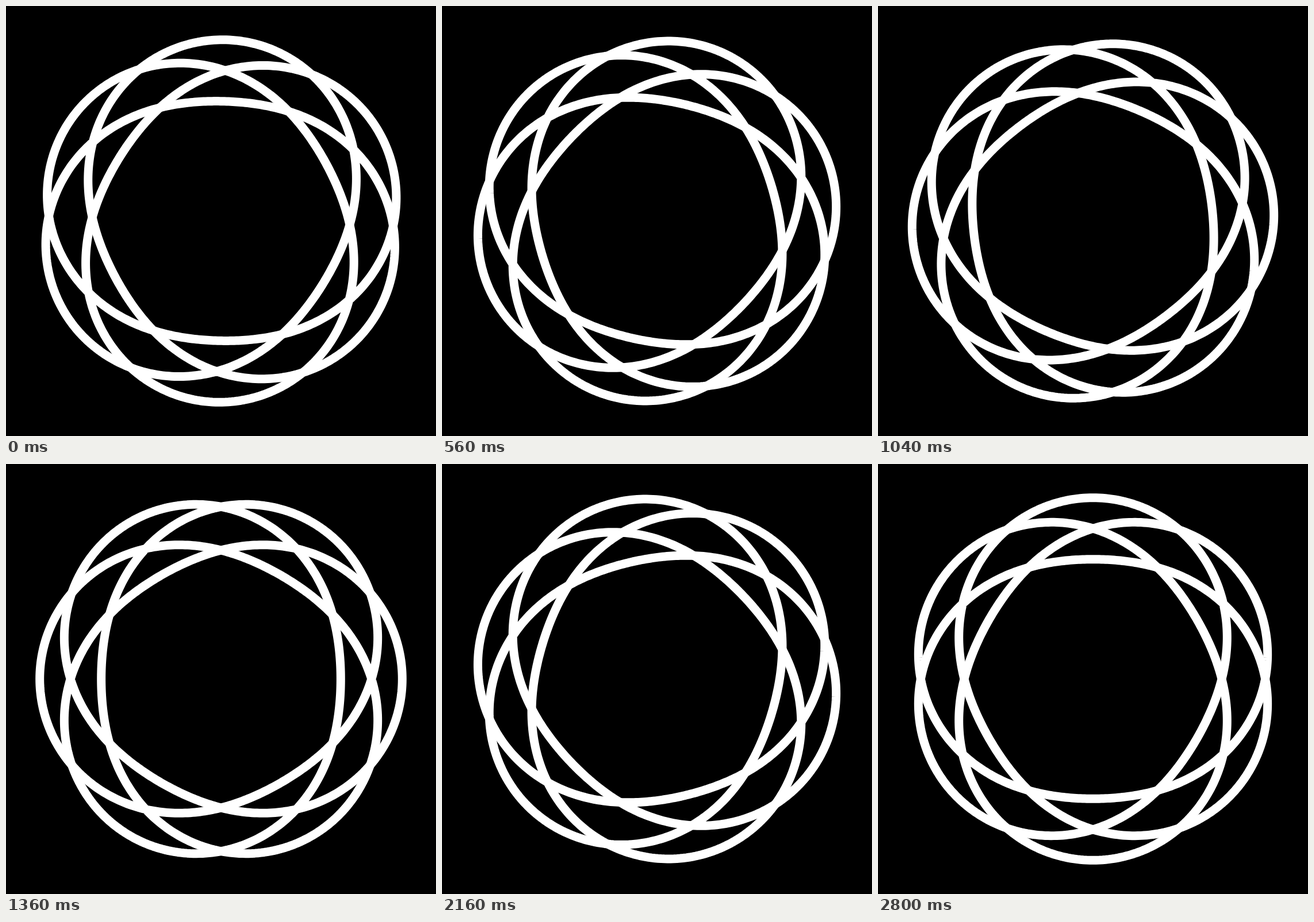
Write an HTML page with a canvas that moves like this. It is 748 px wide and 748 px high and loops after 2.88 s.

```html
<!DOCTYPE html>
<html lang="en">
<head>
<meta charset="utf-8">
<title>Turning rosette</title>
<style>
  html, body { margin: 0; width: 100%; height: 100%; overflow: hidden; background: #000; }
  canvas { display: block; }
</style>
</head>
<body>
<canvas id="stage" width="748" height="748"></canvas>
<script>
const ctx = document.getElementById('stage').getContext('2d');
const SIZE = 748, LOOP = 2880, STEP = 80;
const RADIUS = 261.8, WAVE = 53.5, LINE = 15;
const TURN = Math.PI / 3; // one loop turns the six-fold figure onto itself

// Radius swings 1.5 times per revolution, so each strand closes after two.
function addStrand(phase) {
  const segments = 720;
  for (let i = 0; i < segments; i++) {
    const angle = i / segments * 4 * Math.PI;
    const r = RADIUS + WAVE * Math.cos(1.5 * angle + phase);
    ctx.lineTo(r * Math.sin(angle), -r * Math.cos(angle));
  }
  ctx.closePath();
}

function draw(time) {
  const step = Math.floor(time % LOOP / STEP) + 1;
  ctx.setTransform(1, 0, 0, 1, 0, 0);
  ctx.fillStyle = '#000';
  ctx.fillRect(0, 0, SIZE, SIZE);
  ctx.translate(SIZE / 2, SIZE / 2);
  ctx.rotate(step * STEP / LOOP * TURN);
  ctx.strokeStyle = '#fff';
  ctx.lineWidth = LINE;
  ctx.lineJoin = 'round';
  for (const phase of [0, Math.PI / 2]) {
    ctx.beginPath();
    addStrand(phase);
    ctx.stroke();
  }
}

const start = performance.now();
function tick() {
  draw(performance.now() - start);
  requestAnimationFrame(tick);
}
tick();
</script>
</body>
</html>
```
